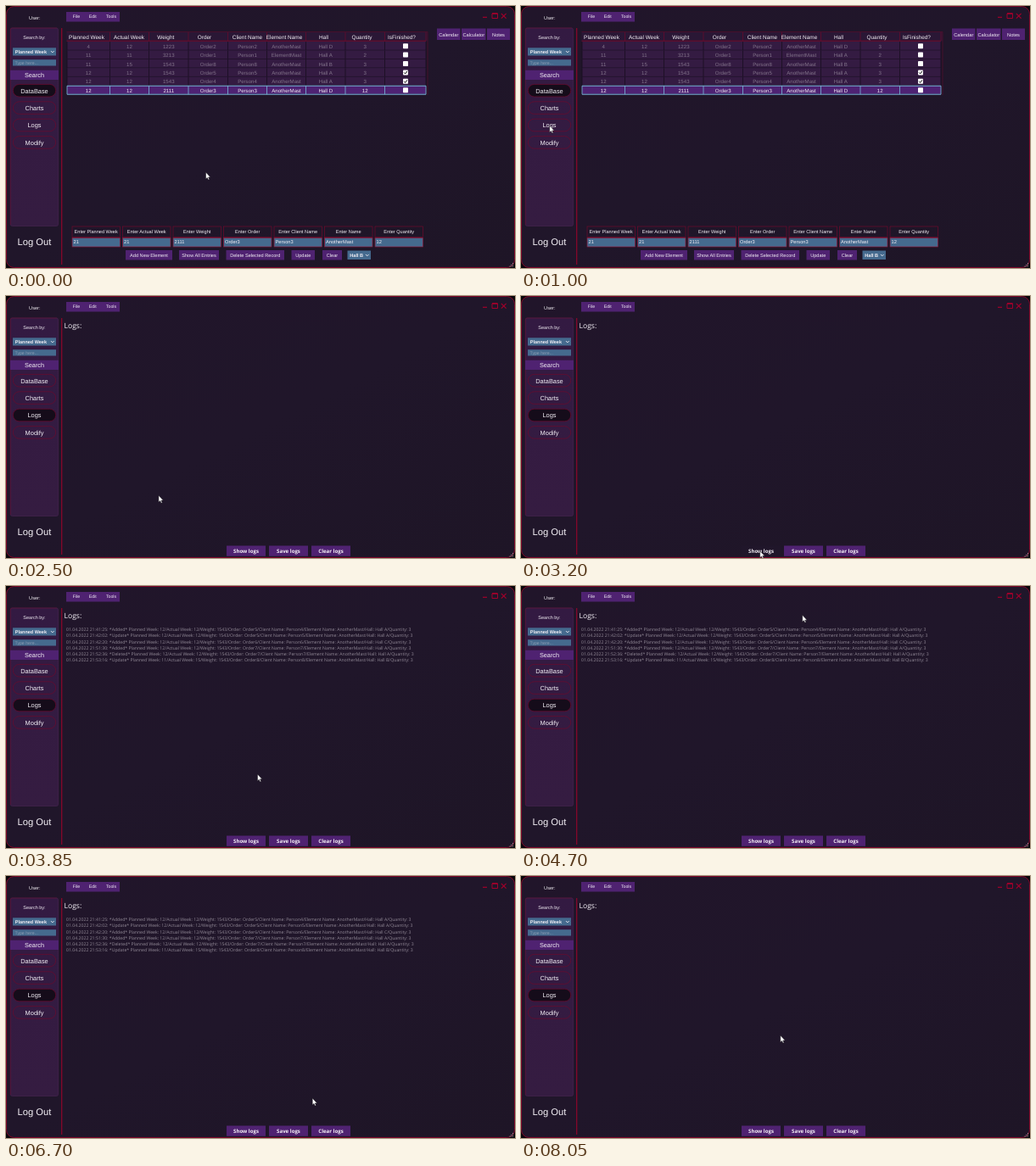
These frames come from a looping animation (600x309 px, 8600 ms). An HTML page:

```html
<!DOCTYPE html>
<html lang="en">
<head>
<meta charset="utf-8">
<title>Production planner</title>
<style>
  html, body { margin: 0; width: 100%; height: 100%; overflow: hidden; background: #08050a; }
  svg { display: block; width: 600px; height: 309px; }
  text { font-family: "Liberation Sans", Arial, sans-serif; text-rendering: geometricPrecision; white-space: pre; }
  .ui { font-family: "Open Sans", "Noto Sans", sans-serif; }
</style>
</head>
<body>
<svg id="stage" viewBox="0 0 600 309">
  <defs>
    <linearGradient id="back" x1="0" y1="0" x2="1" y2="1">
      <stop offset="0" stop-color="#21152a"/>
      <stop offset=".5" stop-color="#20162a"/>
      <stop offset="1" stop-color="#1e1526"/>
    </linearGradient>
    <linearGradient id="side" x1="0" y1="0" x2="0" y2="1">
      <stop offset="0" stop-color="#331a42"/>
      <stop offset="1" stop-color="#351c41"/>
    </linearGradient>
  </defs>
</svg>
<script>
const LOOP = 8600, STEP = 50;
const PURPLE = '#4f2271', BLUE = '#456a8e', RED = '#a3002b', DIM = '#6d0a2c', WHITE = '#f4f0f6';
const stage = document.getElementById('stage');

function add(parent, tag, attrs, content) {
  const el = document.createElementNS('http://www.w3.org/2000/svg', tag);
  for (const key in attrs) el.setAttribute(key, attrs[key]);
  if (content) el.textContent = content;
  parent.appendChild(el);
  return el;
}
const group = () => add(stage, 'g', {});
const path = (g, d, stroke, width = 1) =>
  add(g, 'path', { d, stroke, 'stroke-width': width, fill: 'none' });
const box = (g, x1, y1, x2, y2, fill, more = {}) =>
  add(g, 'rect', { x: x1, y: y1, width: x2 - x1, height: y2 - y1, fill, ...more });

// y is the middle of the capitals
function label(g, str, x, y, size, more = {}) {
  return add(g, 'text', {
    x, y: y + size * 0.36, 'font-size': size, fill: WHITE, 'text-anchor': 'middle', ...more
  }, str);
}
const left = { 'text-anchor': 'start' };
const bold = { 'font-weight': 700 };

function button(g, str, x1, y1, x2, y2, size, more) {
  const face = box(g, x1, y1, x2, y2, PURPLE);
  label(g, str, (x1 + x2) / 2, (y1 + y2) / 2 + 0.2, size, more);
  return face;
}
function combo(g, str, x1, y1, x2, y2, size) {
  box(g, x1, y1, x2, y2, BLUE);
  label(g, str, x1 + 2.8, (y1 + y2) / 2 + 0.2, size, { ...left, ...bold });
  path(g, `M${x2 - 6} ${(y1 + y2) / 2 - 0.8}l1.8 1.8l1.8 -1.8`, WHITE, 0.9);
}

function drawFrame() {
  const g = group();
  box(g, 0.5, 0.5, 599.5, 308.5, 'url(#back)', { rx: 9, stroke: '#7f0729' });
  label(g, 'User:', 33.8, 13.6, 5.6);
  box(g, 71, 7, 134, 18.5, PURPLE);
  [['File', 83], ['Edit', 102.3], ['Tools', 124]].forEach(([s, x]) => label(g, s, x, 12.4, 5.2));

  path(g, 'M562 13.3h5', RED, 1.2);
  path(g, 'M573 9h6.5v5.5h-6.5z', RED);
  path(g, 'M573 8.8h6.5', RED, 1.6);
  path(g, 'M583.8 8.8l5.8 5.8m0 -5.8l-5.8 5.8', RED, 1.2);

  box(g, 5.3, 26, 61.5, 259.5, 'url(#side)', { rx: 2, stroke: '#47234f', 'stroke-width': 0.7 });
  path(g, 'M5.3 258V28q0 -2 2 -2H60', '#671035', 0.6);
  path(g, 'M65.7 26V305', '#8e062b', 1.2);
  label(g, 'Search by:', 33.5, 36.7, 5.5);
  combo(g, 'Planned Week', 8, 49.3, 59, 58.5, 5.5);
  box(g, 8, 63.2, 59, 70.5, BLUE);
  label(g, 'Type here...', 10.5, 67, 5.2, { ...left, fill: '#8b9cb3' });
  button(g, 'Search', 5, 75.8, 62, 87, 7.3);
  label(g, 'Log Out', 33.5, 277.7, 11.2);

  for (let i = 0; i < 3; i++)
    for (let j = 0; j <= i; j++) box(g, 597 - j * 1.8, 303 + i * 1.8, 598 - j * 1.8, 304 + i * 1.8, '#a39ca6');
}

function drawNav() {
  const g = group();
  return ['DataBase', 'Charts', 'Logs', 'Modify'].map((s, i) => {
    const y = 99.7 + i * 20.4;
    const pill = box(g, 8.3, y - 7.3, 58.7, y + 7.3, 'none', { rx: 7.3, stroke: DIM, 'stroke-width': 0.7 });
    label(g, s, 33.5, y + 0.2, 7.4);
    return pill;
  });
}

function drawTable(g) {
  const edges = [72, 122.5, 168.5, 215, 261.5, 307.5, 353.5, 400, 446.5, 495];
  const heads = ['Planned Week', 'Actual Week', 'Weight', 'Order', 'Client Name', 'Element Name', 'Hall', 'Quantity', 'IsFinished?'];
  const headX = [95, 145, 188.3, 234, 284.5, 328, 374.5, 419.5, 466.5];
  const rows = [
    '4,12,1223,Order2,Person2,AnotherMast,Hall D,3',
    '11,11,3213,Order1,Person1,ElementMast,Hall A,2',
    '11,15,1543,Order8,Person8,AnotherMast,Hall B,3',
    '12,12,1543,Order5,Person5,AnotherMast,Hall A,3',
    '12,12,1543,Order4,Person4,AnotherMast,Hall A,3',
    '12,12,2111,Order3,Person3,AnotherMast,Hall D,12'
  ];
  const mid = i => (edges[i] + edges[i + 1]) / 2;

  box(g, 71.5, 30.5, 497, 41.5, '#2a1735');
  path(g, 'M71.5 30.5H497V105', '#570c2b', 0.7);
  path(g, 'M71.5 41.2H495', '#8a082c', 0.8);
  heads.forEach((s, i) => {
    label(g, s, headX[i], 36.6, 6.45);
    path(g, `M${edges[i + 1]} 31V41`, DIM, 0.7);
  });

  rows.forEach((row, r) => {
    const y = 47.2 + r * 10.4, picked = r === 5;
    box(g, 72, y - 5.2, 495, y + 5.2, picked ? '#4e2273' : '#341b42');
    path(g, `M72 ${y + 5}H495`, '#190f20', 0.8);
    edges.forEach(x => path(g, `M${x} ${y - 5}V${y + 5}`, picked ? '#79b9da' : '#190f20', 0.8));
    if (picked) path(g, `M72 ${y - 5}H495M72 ${y + 5}H495`, '#79b9da', 1);
    row.split(',').forEach((s, i) => label(g, s, mid(i), y + 0.4, 6.1, { fill: picked ? WHITE : '#82738a' }));
    box(g, 468, y - 3, 474, y + 3, '#fff', { rx: 0.8 });
    if (r === 3 || r === 4) path(g, `M469.2 ${y}l1.4 1.6l2.4 -3.2`, '#111', 1);
  });
}

function drawForm(g) {
  const fields = [
    ['Planned Week', '21'], ['Actual Week', '21'], ['Weight', '2111'], ['Order', 'Order3'],
    ['Client Name', 'Person3'], ['Name', 'AnotherMast'], ['Quantity', '12']
  ];
  fields.forEach(([name, value], i) => {
    const x = 78 + i * 59.5;
    box(g, x, 260, x + 56.5, 272.5, 'none', { stroke: DIM, 'stroke-width': 0.7 });
    label(g, 'Enter ' + name, x + 28.2, 266.4, 5.6);
    box(g, x, 273.5, x + 56.5, 284, BLUE, { stroke: '#8f1839', 'stroke-width': 0.7 });
    label(g, value, x + 1.5, 277.6, 5.7, left);
  });
  [['Add New Element', 141, 196], ['Show All Entries', 204, 251], ['Delete Selected Record', 259.5, 328],
   ['Update', 336.5, 364], ['Clear', 373, 396]]
    .forEach(([s, a, b]) => button(g, s, a, 288, b, 299.5, 5.6));
  combo(g, 'Hall B', 402.5, 288.5, 430, 299, 5.6);
  [['Calendar', 508, 535.5], ['Calculator', 537, 565.5], ['Notes', 567, 594]]
    .forEach(([s, a, b]) => button(g, s, a, 26.5, b, 40, 5.7));
}

function drawLogs(g) {
  label(g, 'Logs:', 68.5, 35.2, 8.6, { ...left, class: 'ui' });
  return ['Show logs', 'Save logs', 'Clear logs'].map((s, i) =>
    button(g, s, 260 + i * 50, 294.5, 306 + i * 50, 306.8, 6.1, { ...bold, class: 'ui' }));
}

function drawEntries(g) {
  const entries = [
    ['41:25', 'Added', 12, 12, 5, 4, 'A'], ['42:02', 'Update', 12, 12, 5, 5, 'A'],
    ['42:20', 'Added', 12, 12, 6, 6, 'C'], ['51:30', 'Added', 12, 12, 7, 7, 'A'],
    ['52:36', 'Deleted', 12, 12, 7, 7, 'A'], ['53:16', 'Update', 11, 15, 8, 8, 'B']
  ];
  entries.forEach(([time, act, plan, real, order, person, hall], i) => label(g,
    `01.04.2022 21:${time}: *${act}* Planned Week: ${plan}/Actual Week: ${real}/Weight: 1543/Order: Order${order}` +
    `/Client Name: Person${person}/Element Name: AnotherMast/Hall: Hall ${hall}/Quantity: 3`,
    71, 51.3 + i * 7.2, 5.17, { ...left, class: 'ui', fill: '#938b98' }));
}

drawFrame();
const pills = drawNav();
const dataView = group(), logView = group(), entryView = group();
drawTable(dataView);
drawForm(dataView);
const logButtons = drawLogs(logView);
drawEntries(entryView);
const pointer = add(stage, 'path', {
  d: 'M0 0V8L1.8 6.4L3 9.1L4.3 8.5L3.1 5.9H5.5Z', fill: '#fff', stroke: '#141018', 'stroke-width': 0.5
});

// time, x, y
const route = [
  [0, 235.5, 196], [50, 235.5, 196], [1000, 33.7, 141], [1800, 33.7, 141], [3050, 281.7, 300.7],
  [3400, 281.7, 300.7], [4650, 331.7, 34], [4750, 331.7, 34.5], [5250, 291.5, 248],
  [5800, 391.5, 299.5], [6400, 391.5, 299.5], [6450, 390, 298], [6550, 390, 298],
  [6700, 361.2, 262], [7300, 305.8, 188], [LOOP, 305.8, 188]
];
const ease = p => p * p * (3 - 2 * p);

function pointerAt(t) {
  const i = route.findIndex(k => k[0] > t);
  const [t0, x0, y0] = route[i - 1], [t1, x1, y1] = route[i];
  const p = ease((t - t0) / (t1 - t0));
  return [x0 + (x1 - x0) * p, y0 + (y1 - y0) * p];
}
const show = (el, on) => el.setAttribute('visibility', on ? 'visible' : 'hidden');
const within = (t, a, b) => t >= a && t < b;

function render(now) {
  const t = Math.floor((now % LOOP) / STEP) * STEP;
  const onLogs = t >= 1550;
  show(dataView, !onLogs);
  show(logView, onLogs);
  show(entryView, within(t, 3450, 8000));
  pills.forEach((pill, i) => pill.setAttribute('fill', i === (onLogs ? 2 : 0) ? '#150c1a' : 'none'));
  logButtons[0].setAttribute('fill', within(t, 3150, 3300) ? '#20162a' : PURPLE);
  logButtons[2].setAttribute('fill', within(t, 6100, 6200) ? '#20162a' : PURPLE);
  pointer.setAttribute('transform', `translate(${pointerAt(t).map(v => v.toFixed(2))})`);
}

const start = performance.now();
function tick() {
  render(performance.now() - start);
  requestAnimationFrame(tick);
}
tick();
</script>
</body>
</html>
```
